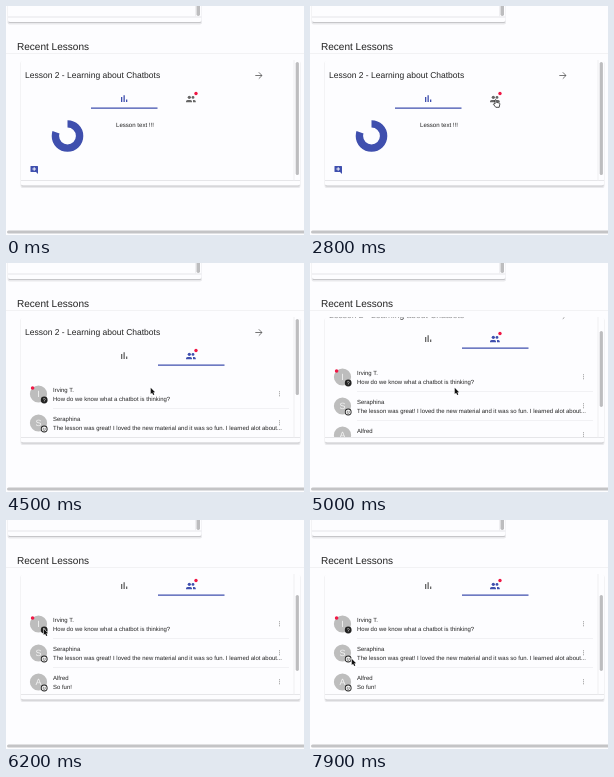
Animation of 298x229 px, one loop 8 s. Source, as an HTML page with a canvas:

```html
<!DOCTYPE html>
<html lang="en">
<head>
<meta charset="utf-8">
<title>Recent Lessons</title>
<style>
html, body { margin: 0; width: 100%; height: 100%; overflow: hidden; background: #fdfdff; }
canvas { display: block; }
</style>
</head>
<body>
<canvas id="stage" width="298" height="229"></canvas>
<script>
const ctx = document.getElementById('stage').getContext('2d');
const LOOP = 8000, STEP = 100;
const PAPER = '#fdfdff', INDIGO = '#3f4fae', RED = '#f01846', INK = '#222', GREY = '#666';

// Each pointer move: start time, end time, destination.
const moves = [
  [100, 200, 176, 46], [500, 700, 177, 51], [900, 1400, 70, 131],
  [1500, 2000, 184, 93], [4200, 4500, 145, 125], [5200, 5600, 63, 119],
  [5600, 6200, 38, 109], [6300, 6500, 36, 119], [7300, 7900, 42, 139]
];

const people = [
  ['Irving T.', 'How do we know what a chatbot is thinking?'],
  ['Seraphina', 'The lesson was great! I loved the new material and it was so fun. I learned alot about...'],
  ['Alfred', 'So fun!']
];

const progress = (t, a, b) => Math.min(1, Math.max(0, (t - a) / (b - a)));
const easeOut = p => 1 - (1 - p) ** 2;
const smooth = p => p * p * (3 - 2 * p);

function pointerAt(t) {
  let x = 231, y = 22;
  for (const [start, end, toX, toY] of moves) {
    const p = smooth(progress(t, start, end));
    x += (toX - x) * p;
    y += (toY - y) * p;
  }
  return [x, y];
}

function rect(x, y, w, h, color, r = 0) {
  ctx.fillStyle = color;
  ctx.beginPath();
  ctx.roundRect(x, y, w, h, r);
  ctx.fill();
}

function dot(x, y, r, color) {
  ctx.fillStyle = color;
  ctx.beginPath();
  ctx.arc(x, y, r, 0, Math.PI * 2);
  ctx.fill();
}

function text(s, x, y, size, color = INK, align = 'left') {
  ctx.font = `${size}px "Liberation Sans", Arial, sans-serif`;
  ctx.textAlign = align;
  ctx.fillStyle = color;
  ctx.fillText(s, x, y);
}

function stroke(d, color, width) {
  ctx.strokeStyle = color;
  ctx.lineWidth = width;
  ctx.stroke(new Path2D(d));
}

function card(x, y, w, h) {
  rect(x - .5, y + 1, w + 1, h + 1.5, '#e9e9ec', 2);
  rect(x + .5, y + h - 1, w - 1, 2, '#c6c6c9', 1);
  rect(x, y, w, h, PAPER, 2);
  rect(x, y + h - 5.5, w, 1, '#e6e6e9');
  rect(x + w - 6.5, y, 1, h - 5, '#efeff2');
}

function page() {
  rect(0, 0, 298, 229, PAPER);
  card(2, -20, 193.5, 36);
  rect(190.5, -3, 3.5, 13, '#bdbdbf', 1.7);
  text('Recent Lessons', 11, 43.9, 10.05);
  rect(0, 47, 298, 1, '#f2f2f4');
  card(15, 54, 279, 125.5);
  rect(1, 224.5, 300, 3, '#c4c4c6', 1.5);
}

function chartIcon(color) {
  rect(115, 91, 1.3, 5, color);
  rect(117.5, 89.3, 1.3, 6.7, color);
  rect(120, 93.5, 1.3, 2.5, color);
}

function groupIcon(color) {
  dot(183.3, 91.3, 1.6, color);
  dot(187, 91.4, 1.4, color);
  rect(180, 93.9, 6, 2.4, color, [1.6, 1.6, 0, 0]);
  rect(187, 94, 2.8, 2.3, color, [0, 1.6, 0, 0]);
  dot(190, 87.5, 1.7, RED);
}

function header(t, listOpen) {
  text('Lesson 2 - Learning about Chatbots', 19, 72.2, 8.5);
  stroke('M249.3 69.5H256M252.8 66.3L256 69.5L252.8 72.7', '#555', .8);
  ctx.globalAlpha = Math.sin(Math.PI * progress(t, 3300, 4000));
  rect(158, 83, 57, 20, '#dadae2');
  ctx.globalAlpha = 1;
  chartIcon(listOpen ? GREY : INDIGO);
  groupIcon(listOpen ? INDIGO : GREY);
  const tabX = 85 + 67 * easeOut(progress(t, 3300, 3800));
  rect(tabX, 101.6, 66.5, 1.2, INDIGO);
}

function lesson() {
  ctx.strokeStyle = INDIGO;
  ctx.lineWidth = 7.4;
  ctx.beginPath();
  ctx.arc(61.5, 130, 12.1, -Math.PI / 2, Math.PI * 1.1);
  ctx.stroke();
  text('Lesson text !!!', 110, 121, 6.1);
  rect(24.5, 160, 7.5, 6, INDIGO, .6);
  ctx.fillStyle = INDIGO;
  ctx.fill(new Path2D('M29 165H32V168Z'));
  stroke('M28.2 161.2V164.8M26.4 163H30', '#fff', .9);
}

function badge(x, y, question) {
  dot(x, y, 3.4, '#222');
  if (question) return text('?', x, y + 1.9, 5.2, '#fff', 'center');
  dot(x, y, 2.5, '#f4f4f4');
  dot(x - .9, y - .7, .45, '#222');
  dot(x + .9, y - .7, .45, '#222');
  stroke(`M${x - 1.4} ${y + .5}Q${x} ${y + 2.2} ${x + 1.4} ${y + .5}`, '#222', .6);
}

function list() {
  people.forEach(([name, message], i) => {
    const y = 131 + 29 * i;
    if (i) rect(47, y - 14.5, 236, .6, '#e6e6e9');
    dot(32.5, y, 8.6, '#bdbdbd');
    text(name[0], 32.5, y + 3.2, 9, '#f4f4f4', 'center');
    if (!i) dot(26.6, y - 6, 1.8, RED);
    badge(38.2, y + 6, !i);
    text(name, 47, y - 2, 5.97);
    text(message, 47, y + 6.8, 5.97);
    for (let n = -1; n <= 1; n++) dot(273.5, y - .3 + 2 * n, .5, '#777');
  });
}

function arrow(x, y) {
  ctx.save();
  ctx.translate(x - .3, y - .3);
  const p = new Path2D('M0 0V6.2L1.4 5L2.5 7.4L3.6 6.9L2.6 4.6H4.4Z');
  ctx.strokeStyle = '#fff';
  ctx.lineWidth = 1;
  ctx.stroke(p);
  ctx.fillStyle = '#111';
  ctx.fill(p);
  ctx.restore();
}

function hand(x, y) {
  ctx.save();
  ctx.translate(x, y);
  const d = 'M1 1Q1.8 0 2.3 1V3.3L5.3 4Q6 4.3 5.8 5.2L5.2 8.3H1.8L-.6 5.3Q-.5 4.2 1 5Z';
  ctx.fillStyle = '#fff';
  ctx.fill(new Path2D(d));
  stroke(d, '#222', .8);
  ctx.restore();
}

function draw(t) {
  const listOpen = t >= 3500;
  const scroll = Math.round(27 * easeOut(progress(t, 4700, 5460)));
  page();
  ctx.save();
  ctx.beginPath();
  ctx.rect(14, 54.5, 280, 119.5);
  ctx.clip();
  ctx.save();
  ctx.translate(0, -scroll);
  header(t, listOpen);
  if (listOpen) list();
  else lesson();
  ctx.restore();
  rect(289.7, 56 + scroll * .7, 3.2, listOpen ? 76 : 113, '#bdbdbf', 1.6);
  ctx.restore();
  if (t < STEP) return;
  const overTab = t >= 1900 && t < 4300;
  (overTab ? hand : arrow)(...pointerAt(t));
}

function frame(now) {
  draw(Math.floor((now % LOOP) / STEP) * STEP);
  requestAnimationFrame(frame);
}

ctx.textRendering = 'geometricPrecision';
requestAnimationFrame(frame);
</script>
</body>
</html>
```
